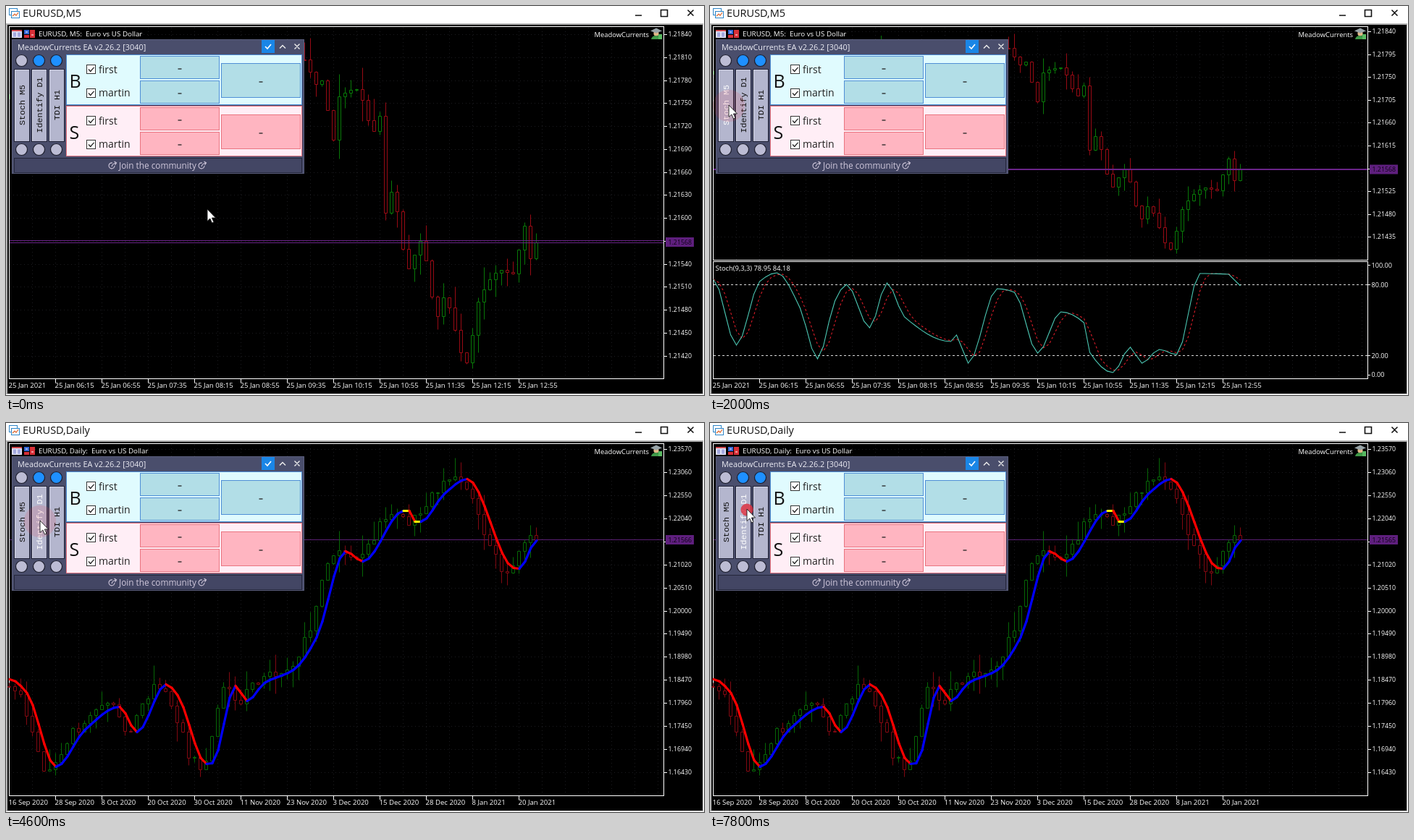
Animation, 964 px wide and 538 px high, one loop 8 s. Source, as an HTML page:

```html
<!DOCTYPE html>
<html lang="en">
<head>
<meta charset="utf-8">
<title>EURUSD chart</title>
<style>
  html, body { margin: 0; width: 100%; height: 100%; overflow: hidden; background: #fff; }
  svg { display: block; width: 964px; height: 538px; }
  text { font-family: "Open Sans", "Noto Sans", sans-serif; white-space: pre; }
  .label { font-weight: 500; }
  .bar { font-family: "Liberation Mono", "Noto Sans Mono", monospace; }
</style>
</head>
<body>
<svg id="stage" viewBox="0 0 964 538"></svg>
<script>
const LOOP = 8000, STEP = 200, BARS = 92;
const GREEN = '#087808', RED = '#980a14', PURPLE = '#6a2488';

// ---------- drawing helpers ----------
const rect = (x, y, w, h, fill, stroke = 'none') =>
  `<rect x="${x}" y="${y}" width="${w}" height="${h}" fill="${fill}" stroke="${stroke}"/>`;
const path = (d, stroke, width = 1, more = '') =>
  `<path d="${d}" fill="none" stroke="${stroke}" stroke-width="${width}" ${more}/>`;
const text = (x, y, s, size, fill = '#fff', more = '') =>
  `<text x="${x}" y="${y}" font-size="${size}" fill="${fill}" ${more}>${s}</text>`;
const label = (x, y, s, size = 9.6, more = '') => text(x, y, s, size, '#fff', 'class="label" ' + more);
const range = (n, fn) => Array.from({ length: n }, (_, i) => fn(i));
const barX = k => 4.5 + 8 * k;
const polyline = ys => 'M' + ys.map((y, k) => `${barX(k)} ${y.toFixed(1)}`).join('L');
const noise = n => { const v = Math.sin(n * 12.9898 + 4.1) * 43758.5453; return v - Math.floor(v); };

// Smooth curve through [x, y] keys that never overshoots them.
function curve(keys) {
  const rise = keys.slice(1).map(([x, y], i) => (y - keys[i][1]) / (x - keys[i][0]));
  const slope = keys.map((_, i) => {
    const a = rise[i - 1], b = rise[i];
    return a * b > 0 ? 2 * a * b / (a + b) : 0;
  });
  return x => {
    const last = keys.length - 1;
    if (x >= keys[last][0]) return keys[last][1];
    const i = keys.findIndex(k => k[0] > x) - 1;
    const [x0, y0] = keys[i], [x1, y1] = keys[i + 1], w = x1 - x0, p = (x - x0) / w, q = 1 - p;
    return y0 * (1 + 2 * p) * q * q + y1 * p * p * (3 - 2 * p) + w * p * q * (slope[i] * q - slope[i + 1] * p);
  };
}

// ---------- chart data: bar number and height in pixels ----------
const m5Close = curve([[51, 74], [53, 108], [54, 103], [56, 185], [57, 125], [60, 115], [63, 173], [64, 152],
  [65, 286], [66, 257], [69, 363], [71, 325], [74, 429], [75, 403], [79, 493], [81, 409], [85, 365],
  [87, 370], [89, 304], [90, 349], [91, 327]]);
const stochMain = curve([[0, 378], [4, 469], [8, 381], [11, 369], [15, 418], [18, 488], [21, 408], [23, 385],
  [27, 445], [30, 383], [33, 430], [41, 464], [42, 455], [44, 494], [49, 391], [52, 396], [56, 480],
  [60, 423], [64, 438], [65, 479], [69, 507], [72, 472], [74, 494], [77, 475], [80, 482], [84, 370],
  [89, 371], [91, 387]]);
const dayMean = curve([[0, 354], [3, 373], [8, 475], [13, 424], [19, 392], [22, 427], [27, 361], [29, 376],
  [34, 471], [35, 470], [39, 363], [41, 384], [44, 359], [49, 341], [53, 296], [58, 177], [61, 191],
  [68, 121], [69, 121], [70, 136], [71, 136], [75, 98], [79, 77], [87, 200], [88, 201], [91, 162]]);

// Each bar opens at the previous close; wicks are seeded.
function makeBars(first, close, wick) {
  return range(BARS - first, i => {
    const k = first + i, open = close(Math.max(first, k - 1)), end = close(k);
    return {
      k, open, close: end,
      hi: Math.min(open, end) - wick * noise(k) ** 2,
      lo: Math.max(open, end) + wick * noise(k + 200) ** 2
    };
  });
}
const m5Bars = makeBars(51, m5Close, 32);
// The mean trails the price by about one and a half bars.
const dayBars = makeBars(0, k => dayMean(k + 1.6) + 16 * (noise(k + 400) - .5), 28);

function candles(bars, toY = y => y) {
  const d = { up: '', down: '' };
  for (const b of bars) {
    const x = barX(b.k), px = y => Math.round(toY(y)) + .5;
    const top = px(Math.min(b.open, b.close)), base = Math.max(top + 1, px(Math.max(b.open, b.close)));
    d[b.close < b.open ? 'up' : 'down'] +=
      `M${x} ${px(b.hi)}V${top}M${x} ${base}V${Math.max(base, px(b.lo))}M${x - 2} ${top}h4V${base}h-4z`;
  }
  return `<path d="${d.up}" fill="#000" stroke="${GREEN}"/><path d="${d.down}" fill="#000" stroke="${RED}"/>`;
}

// ---------- chart furniture ----------
const grid = ys =>
  path(range(28, i => `M${36.5 + 32 * i} 30V515`).join('') + ys.map(y => `M5 ${y}H908`).join(''),
    '#1c1c20', 1, 'stroke-dasharray="1 4"');
const levels = (n, y0, dy) => range(n, i => Math.round(y0 + dy * i) + .5);
const priceAxis = (ys, top, step) => ys.map((y, i) =>
  path(`M909 ${y}h4`, '#fff') + label(914.5, y + 2.9, (top - step * i).toFixed(5), 8.8)).join('');
const dateAxis = names => names.map((s, i) =>
  (i ? path(`M${4.5 + 64 * i} 516v5`, '#fff') : '') + label(3.5 + 64 * i, 528, s)).join('');
const priceTag = (y, more = '') => rect(911, y - 6.5, 39, 13, '#5f1f7e') +
  text(914.5, y + 3.2, '1.21568', 8.8, '#0c0414', more);
const header = tf => label(45, 42, `EURUSD, ${tf}:  Euro vs US Dollar`, 9.8);
const frame = (y, h) => rect(4.5, y, 904, h, 'none', '#fff');

const pad = n => String(n).padStart(2, '0');
const m5Dates = range(12, i => {
  const m = 335 + 40 * i;
  return i ? `25 Jan ${pad(Math.floor(m / 60))}:${pad(m % 60)}` : '25 Jan 2021';
});
const dayDates = ['16 Sep 2020', '28 Sep 2020', '8 Oct 2020', '20 Oct 2020', '30 Oct 2020', '11 Nov 2020',
  '23 Nov 2020', '3 Dec 2020', '15 Dec 2020', '28 Dec 2020', '8 Jan 2021', '20 Jan 2021'];

function fullChart() {
  const ys = levels(15, 39, 31.75);
  return grid(ys) + frame(28.5, 487) + path('M5.5 122v7', GREEN) + candles(m5Bars) +
    path('M5 324.5H908M5 327.5H908', PURPLE) +
    priceAxis(ys, 1.2184, .0003) + priceTag(326.5) + dateAxis(m5Dates) + header('M5');
}

function stochChart() {
  const ys = levels(10, 35, 31.6), main = range(BARS, stochMain);
  const signal = main.map((y, k) => (y + main[Math.max(0, k - 1)] + main[Math.max(0, k - 2)]) / 3);
  const scale = [[358.5, '100.00'], [385.5, '80.00'], [483.5, '20.00'], [510, '0.00']];
  return grid(ys) + frame(28.5, 323) + frame(353.5, 162) +
    path('M236.5 41v6M5.5 90v5', GREEN) + candles(m5Bars, y => 35 + (y - 39) * .6637) +
    path('M5 226H908', PURPLE, 2) +
    path('M5 385.5H908M5 483.5H908', '#d8d8d8', 1, 'stroke-dasharray="3 3"') +
    path(polyline(signal), '#d81c28', 1.1, 'stroke-dasharray="3 3"') +
    path(polyline(main), '#4cc8b4', 1.1) +
    label(7.5, 366, 'Stoch(9,3,3) 78.95 84.18', 9.4) +
    scale.map(([y, s]) => path(`M909 ${Math.floor(y) + .5}h3`, '#fff') + label(913.5, y + 3.4, s, 9.1)).join('') +
    priceAxis(ys, 1.2184, .00045) + priceTag(226) + dateAxis(m5Dates) + header('M5');
}

function dailyChart() {
  const ys = levels(15, 36, 31.93);
  const mean = range(BARS - 1, k => {
    const a = dayMean(k), b = dayMean(k + 1), color = a === b ? '#ff0' : b > a ? '#f00' : '#00f';
    return path(`M${barX(k) + .5} ${a + .5}L${barX(k + 1) + .5} ${b + .5}`, color, 3.2, 'stroke-linecap="round"');
  }).join('');
  return grid(ys) + frame(28.5, 487) + path('M5 161.5H908', '#5a1f74') +
    `<g opacity=".85">${candles(dayBars)}</g>` + mean +
    priceAxis(ys, 1.2357, .0051) + priceTag(161.5, 'id="dayPrice"') + dateAxis(dayDates) + header('Daily');
}

// ---------- trade panel ----------
const checkbox = y => rect(111.5, y + .5, 12, 12, '#fff', '#333') +
  path(`M114 ${y + 6.5}l2.7 3 4.8-5.6`, '#222', 1.3);
const tradeButton = (x, y, w, h, look) =>
  rect(x + .5, y + .5, w - 1, h - 1, look.button, look.edge) +
  path(`M${x + w / 2 - 2.5} ${y + h / 2 + 2}h5`, '#222', 1.3);

function side(y, letter, look) {
  return rect(83.5, y + .5, 325, 69, look.back, look.edge) +
    text(87.5, y + 46, letter, 25, '#111', `id="side${letter}"`) +
    checkbox(y + 14) + text(128, y + 25.5, 'first', 14, '#222', `id="first${letter}"`) +
    checkbox(y + 47) + text(128, y + 57.5, 'martin', 14, '#222') +
    tradeButton(185, y + 2, 110, 32, look) + tradeButton(185, y + 36, 110, 32, look) +
    tradeButton(297, y + 12, 110, 48, look);
}

function column(name, i) {
  const x = 21.5 + 24 * i;
  const dot = (y, fill) => `<circle cx="${x}" cy="${y}" r="8" fill="${fill}" stroke="#1c1d2c" stroke-width="1.2"/>`;
  return dot(75.5, i ? '#1e90ff' : '#bcbcd4') + dot(198.5, '#bcbcd4') +
    rect(x - 10, 87.5, 21, 100, '#b4b6ce', '#1f2136') +
    path(`M${x - 9} 187V88.5h19`, '#d6d8e8') +
    text(0, 0, name, 11.7, '#111', `class="bar" text-anchor="middle" transform="translate(${x + 4} 137) rotate(-90)"`);
}

const joinIcon = x => path(`M${x + 8} 221a4 4 0 1 1-3-4M${x + 4} 222q1-4 6-5m-2.5-2l3 2-2 3`, '#d0c8dc', 1.1);

function panel() {
  const buy = { back: '#e0fbfe', button: '#b2dee7', edge: '#4f8fd6' };
  const sell = { back: '#ffeef6', button: '#ffb5c1', edge: '#ea7480' };
  return rect(8, 46, 404, 186, '#4a4e6c') +
    path('M8.5 232V46.5H411.5V231.5H8', '#5a5e7c') +
    text(16, 60.5, 'MeadowCurrents EA v2.26.2 [3040]', 10.9, '#ececf4') +
    rect(353, 47, 18, 18, '#1a86e6') + path('M358 56l3 3 5-6', '#fff', 1.6) +
    path('M378 58.5l4-4 4 4M398.5 52.5l7 7m0-7l-7 7', '#eee', 1.4) +
    ['Stoch M5', 'Identify D1', 'TDI H1'].map(column).join('') +
    side(67, 'B', buy) + side(138, 'S', sell) +
    rect(11.5, 210.5, 397, 20, '#434664', '#24263a') + joinIcon(142) + joinIcon(266) +
    text(209.5, 225, 'Join the community', 11.8, '#d0c8dc', 'text-anchor="middle"');
}

// ---------- window ----------
function windowFrame() {
  return rect(0, 0, 964, 538, '#fff') + rect(0, 24, 963, 513, '#b4b4b4') + rect(2, 26, 960, 510, '#000') +
    rect(4.5, 3.5, 11, 9, '#fff', '#2f86c8') + rect(7.5, 7.5, 11, 9, '#fff', '#2f86c8') +
    path('M9 14l3-3 2 2 3-4', '#e0662c', 1.2) +
    text(23, 15, '', 14.5, '#111', 'id="title"') +
    path('M869 13h9M904.5 5.5h9v9h-9zM941.5 5.5l8 8m0-8l-8 8', '#111', 1.6);
}
function chartIcons() {
  return rect(8, 33, 14, 11, '#dfe0f6') + rect(8, 33, 14, 2, '#d04a50') +
    path('M10 37.5h4M16 37.5h4M10 39.5h4M16 39.5h4M10 41.5h4M16 41.5h4', '#6a74c8') +
    rect(25, 33, 7, 6, '#3468d8') + rect(33, 33, 7, 11, '#d83038') + rect(25, 40, 7, 4, '#d83038') +
    path('M27 36h3M35 40h3', '#fff') +
    label(888, 42.5, 'MeadowCurrents', 9.4, 'text-anchor="end"') +
    '<circle cx="898" cy="38" r="3.6" fill="#e0b888"/><path d="M891 46q1-5 7-5t7 5z" fill="#3f9a48"/>' +
    '<path d="M890 34.5l8-4 8 4-8 3z" fill="#98a4a8"/>' + rect(901, 39, 5, 7, '#58b860');
}

const stage = document.getElementById('stage');
stage.innerHTML = windowFrame() +
  `<g id="full">${fullChart()}</g><g id="stoch">${stochChart()}</g><g id="daily">${dailyChart()}</g>` +
  chartIcons() + panel() +
  '<circle id="click" fill="#e0323f"/>' +
  '<path id="cursor" d="M0 0V16.5L3.8 13 6.5 19 9 18 6.4 12H11.5z" fill="#fff" stroke="#1a1a1a" stroke-width=".9"/>';

const el = id => document.getElementById(id);
const bars = [...document.querySelectorAll('.bar')];

// ---------- motion ----------
const moves = [[0, 278, 281], [600, 92, 157], [1200, 26, 137], [3400, 26, 137], [4000, 47, 135],
  [5400, 47, 135], [6000, 45, 32], [6800, 45, 32], [7600, 51, 119]];
const clicks = [1500, 3150, 4100, 7780];
const CLICK_MS = 600;
const cursorX = curve(moves.map(([t, x]) => [t, x]));
const cursorY = curve(moves.map(([t, , y]) => [t, y]));
const viewAt = t => t < 1800 ? 'full' : t < 3400 ? 'stoch' : t < 4400 ? 'full' : 'daily';

function render(t) {
  const view = viewAt(t), x = cursorX(t), y = cursorY(t);
  for (const id of ['full', 'stoch', 'daily']) el(id).style.display = id === view ? '' : 'none';
  el('title').textContent = 'EURUSD,' + (view === 'daily' ? 'Daily' : 'M5');
  el('dayPrice').textContent = t < 7200 ? '1.21566' : '1.21565';

  const onBar = x < 82 && y > 87 && y < 188 ? Math.floor((x - 10) / 24) : -1;
  bars.forEach((b, i) => b.setAttribute('fill', i === onBar ? '#fff' : '#111'));
  const onSell = x > 83 && x < 180 && y > 138 && y < 172;
  el('sideS').setAttribute('fill', onSell ? '#f4401c' : '#111');
  el('firstS').setAttribute('fill', onSell ? '#f4502c' : '#222');

  const start = clicks.find(c => t >= c && t < c + CLICK_MS);
  const p = start === undefined ? 1 : (t - start) / CLICK_MS;
  const ring = el('click');
  ring.setAttribute('cx', x);
  ring.setAttribute('cy', y + 1);
  ring.setAttribute('r', 8 + 17 * p);
  ring.setAttribute('opacity', .85 * (1 - p));
  el('cursor').setAttribute('transform', `translate(${x} ${y})`);
}

function tick() {
  const t = performance.now() % LOOP;
  render(Math.floor(t / STEP) * STEP);
  requestAnimationFrame(tick);
}
tick();
</script>
</body>
</html>
```
